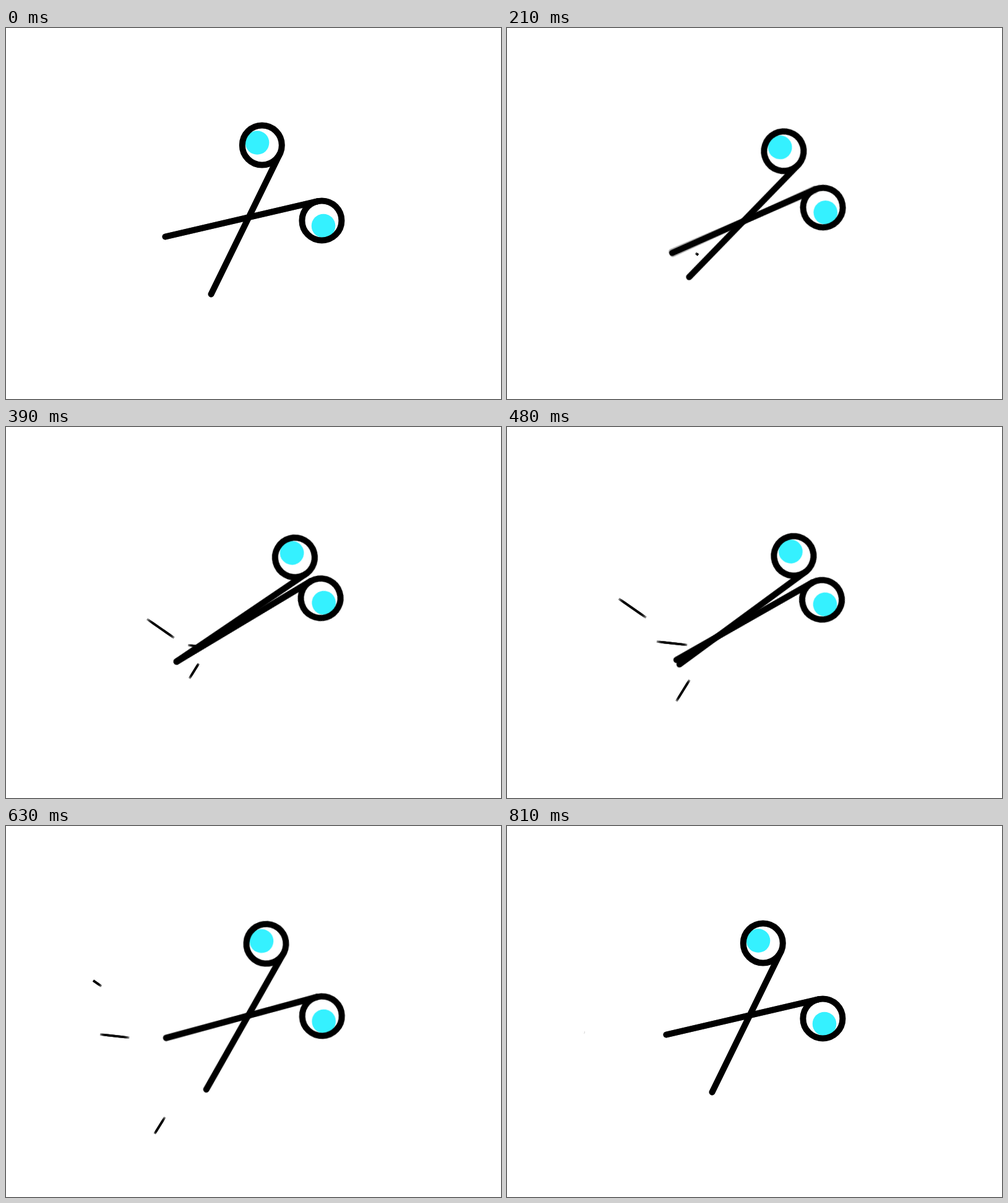
An HTML page for the animation above (1350 ms loop, 800x600 px).

```html
<!DOCTYPE html>
<html lang="en">
<head>
<meta charset="utf-8">
<title>Scissors</title>
<style>
  @property --head { syntax: "<length>"; inherits: false; initial-value: 0px; }
  @property --tail { syntax: "<length>"; inherits: false; initial-value: 0px; }

  html, body { margin: 0; width: 100%; height: 100%; overflow: hidden; background: #fff; }
  svg { display: block; width: 100vw; height: 100vh; --now: 0ms; --shift: 0ms; }

  .blade {
    transform-origin: 400px 300px;
    animation: swing 1350ms infinite paused;
    animation-delay: calc(var(--shift) - var(--now));
  }
  .upper { --turn: 29.8deg; }
  .lower { --turn: -17.9deg; }
  .blade, .ring { fill: none; stroke: #000; stroke-width: 10; stroke-linecap: round; }
  .eye { fill: #35f1ff; stroke: none; }
  .ghost { opacity: .3; }

  /* closed at 390 ms, open again at 738 ms */
  @keyframes swing {
    0% { transform: rotate(0deg); animation-timing-function: cubic-bezier(.65, 0, .35, 1); }
    28.889% { transform: rotate(var(--turn)); animation-timing-function: cubic-bezier(.67, 0, .33, 1); }
    54.667%, 100% { transform: rotate(0deg); }
  }

  .tick {
    fill: none;
    stroke: #000;
    stroke-width: 3.6;
    opacity: .5;
    stroke-dasharray: calc(var(--head) - var(--tail)) 300px;
    stroke-dashoffset: calc(0px - var(--tail));
    animation: head 459ms cubic-bezier(.3333, 0, .6667, 1) both paused,
               tail 459ms cubic-bezier(.3333, 0, .6667, 1) both paused;
    animation-delay: calc(var(--start) + var(--shift) - var(--now)),
                     calc(var(--start) + 68ms + var(--shift) - var(--now));
  }
  @keyframes head { from { --head: 0px; } to { --head: 100px; } }
  @keyframes tail { from { --tail: 0px; } to { --tail: 100px; } }
</style>
</head>
<body>
<svg id="stage" viewBox="0 0 800 600">
  <g id="ticks"></g>

  <path class="blade lower ghost" style="--shift:-7ms" d="M257.5 337.5L503.2 280.3"/>
  <path class="blade lower ghost" style="--shift:7ms" d="M257.5 337.5L503.2 280.3"/>

  <g class="blade lower">
    <circle class="eye" cx="513" cy="320" r="19.3"/>
    <circle class="ring" cx="510.4" cy="311.4" r="32"/>
    <path d="M257.5 337.5L503.2 280.3"/>
  </g>

  <g class="blade upper">
    <circle class="eye" cx="406" cy="185.5" r="19.3"/>
    <circle class="ring" cx="413.8" cy="189.5" r="32"/>
    <path d="M331.5 430.5L442.4 203.8"/>
  </g>
</svg>
<script>
  const stage = document.getElementById("stage");
  const ticks = document.getElementById("ticks");
  const LOOP = 1350, STEP = 30;

  // Each tick is layered at nearby times, so its ends blur along the motion.
  function addTick(d, start) {
    for (const shift of [-8, -4, 0, 4, 8]) {
      const path = document.createElementNS("http://www.w3.org/2000/svg", "path");
      path.setAttribute("class", "tick");
      path.setAttribute("d", d);
      path.setAttribute("pathLength", 100);
      path.style.setProperty("--start", start + "ms");
      path.style.setProperty("--shift", shift + "ms");
      ticks.append(path);
    }
  }
  addTick("M309 367L141 250", 174);
  addTick("M324.5 356.2L125 334", 285);
  addTick("M315.1 376.5L234.2 507.5", 255);

  // The picture advances in steps of 30 ms.
  const begin = performance.now();
  function tick() {
    const t = (performance.now() - begin) % LOOP;
    stage.style.setProperty("--now", Math.floor(t / STEP) * STEP + "ms");
    requestAnimationFrame(tick);
  }
  tick();
</script>
</body>
</html>
```
